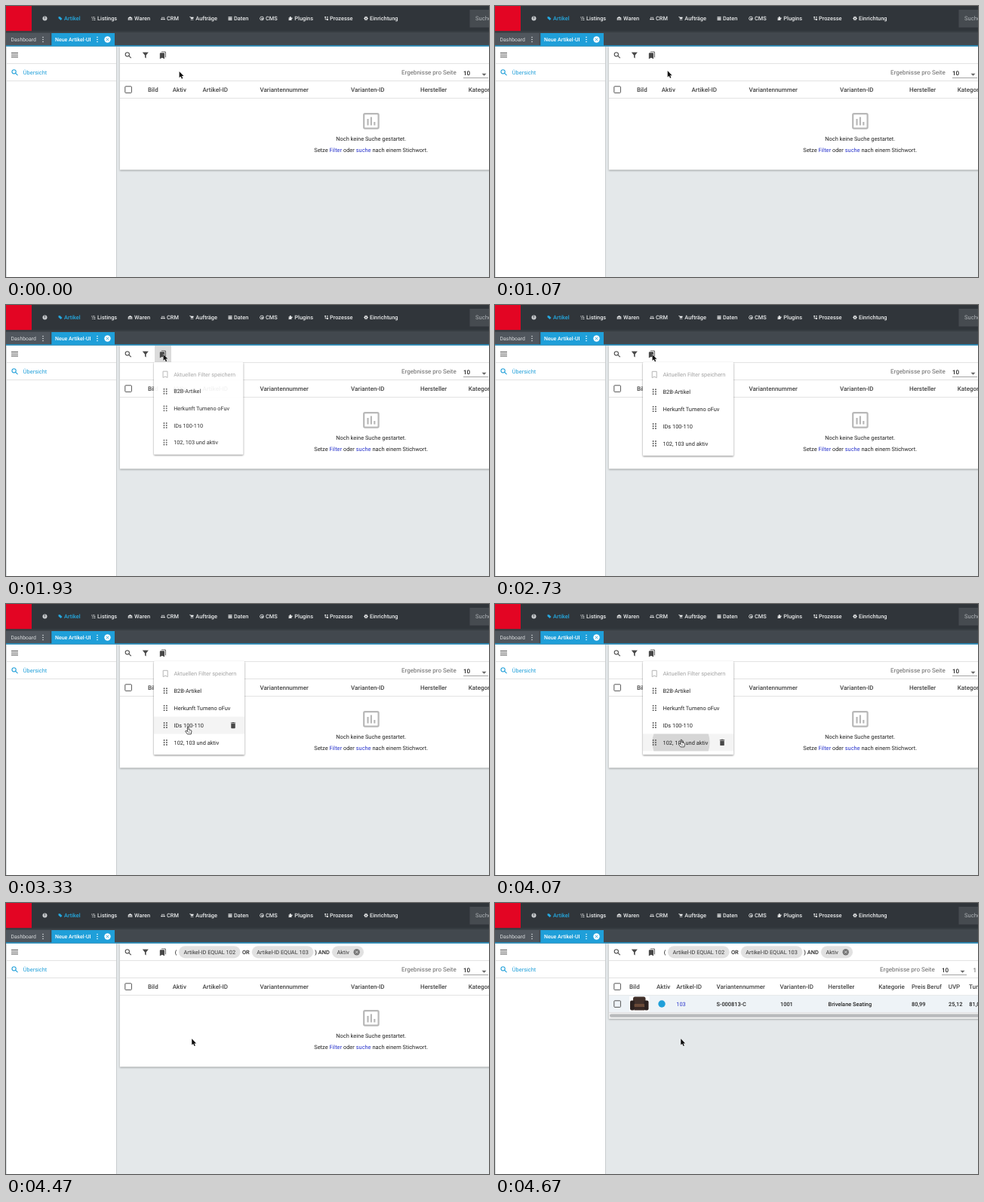
Recreate the animation shown at these times as an HTML page. Size 640 by 360 pixels, loop 6.33 s.

```html
<!DOCTYPE html>
<html lang="de">
<head>
<meta charset="utf-8">
<title>Artikelsuche mit gespeichertem Filter</title>
<style>
  html, body { margin: 0; width: 100%; height: 100%; overflow: hidden; background: #e4e8ea; }
  svg { display: block; }
  #stage { width: 100vw; height: 100vh; }
  text { font-family: Roboto, Arial, sans-serif; text-rendering: geometricPrecision; white-space: pre; }
  .card { filter: drop-shadow(0 1px 1px #0005); }
  .menu { filter: drop-shadow(0 1.2px 1.3px #0007); }
</style>
</head>
<body>
<svg id="stage" viewBox="0 0 640 360"></svg>
<script>
const LOOP = 6330, BLUE = '#1f9fd9', LINK = '#2a35cc', INK = '#222', ICON = '#484848';

const clamp = v => Math.max(0, Math.min(1, v));
const span = (k, a, b) => clamp((k - a) / (b - a));
const mix = (a, b, u) => a + (b - a) * u;
const smooth = u => u * u * (3 - 2 * u);
const cubic = u => u < .5 ? 4 * u ** 3 : 1 - 4 * (1 - u) ** 3;
const easeOut = u => 1 - (1 - u) ** 2.5;

const rect = (x, y, w, h, fill, more = '') =>
  `<rect x="${x}" y="${y}" width="${w}" height="${h}" fill="${fill}" ${more}/>`;
const dot = (x, y, r, fill, more = '') =>
  `<circle cx="${x}" cy="${y}" r="${r}" fill="${fill}" ${more}/>`;
const path = (d, fill, more = '') => `<path d="${d}" fill="${fill}" ${more}/>`;
const text = (x, y, s, fill = INK, size = 7.4, weight = 400, more = '') =>
  `<text x="${x}" y="${y}" fill="${fill}" font-size="${size}" font-weight="${weight}" ${more}>${s}</text>`;
const rule = (x, y, w, fill = '#dcdcdc') => rect(x, y, w, .8, fill);

// Icons live on a 24 unit grid
const shapes = {
  funnel: 'M2 2h20l-8 10v10l-4-3v-7z',
  bookmarks: 'M19 18l2 1V3a2 2 0 0 0-2-2H9a2 2 0 0 0-2 2h10a2 2 0 0 1 2 2zM15 5H5a2 2 0 0 0-2 2v16l7-3 7 3V7a2 2 0 0 0-2-2z',
  trash: 'M6 19a2 2 0 0 0 2 2h8a2 2 0 0 0 2-2V7H6zM19 4h-3.5l-1-1h-5l-1 1H5v2h14z',
  tag: 'M2 3h9l11 11-8 8L2 11z',
  list: 'M1 4h4v4H1zM8 4h10v3H8zM4 11h4v3H4zM11 11h11v3H11zM4 18h4v3H4zM11 18h11v3H11z',
  store: 'M1 22V9l11-7 11 7v13h-4V12H5v10zM8 14h8v3H8zM8 19h8v3H8z',
  people: 'M5 5h5v5H5zM14 5h5v5h-5zM1 19v-6h10v6zM13 19v-6h10v6z',
  cart: 'M1 2h5l1 3h16l-3 10H8L5 5H1zM8 18h4v4H8zM16 18h4v4h-4z',
  server: 'M2 3h20v5H2zM2 10h20v5H2zM2 17h20v5H2z',
  globe: 'M12 1a11 11 0 1 0 .1 0zM12 4a8 8 0 1 1-.1 0zM8 10h12v3H8zM10 15h9v3h-9z',
  puzzle: 'M2 8h6V2h6v6h8v6h-4v8H2v-6h4v-3H2z',
  flow: 'M3 2h7v6H8v8h6v-3h8v9h-8v-3H5V8H3zM14 3h7v5h-7z',
  gear: 'M10 1h4v4l4-2 3 4-3 3h5v4h-5l3 3-3 4-4-3v5h-4v-5l-4 3-3-4 3-3H1v-4h5L3 7l3-4 4 2zM12 9a3 3 0 1 0 .1 0z'
};
const at = (x, y, size, inner) =>
  `<g transform="translate(${x - size / 2} ${y - size / 2}) scale(${size / 24})">${inner}</g>`;
const icon = (name, x, y, size, fill = ICON) => at(x, y, size, path(shapes[name], fill, 'fill-rule="evenodd"'));
const search = (x, y, c) => at(x, y, 11.5,
  `<g fill="none" stroke="${c}" stroke-width="2.2"><circle cx="9.5" cy="9.5" r="5.5"/><path d="M13.5 13.5l6.3 6.3"/></g>`);
const kebab = (x, y, c) => [-3, 0, 3].map(d => dot(x, y + d, .8, c)).join('');
const close = (x, y, back, c) => dot(x, y, 4.2, back) +
  path(`M${x - 1.6} ${y - 1.6}l3.2 3.2m0-3.2l-3.2 3.2`, 'none', `stroke="${c}" stroke-width=".9"`);
const checkbox = y => rect(157.8, y - 4.2, 8.6, 8.6, 'none', 'stroke="#555" rx=".8"');

const nav = [
  ['tag', 72, 77, 'Artikel'], ['list', 116, 121, 'Listings'], ['store', 164.5, 170, 'Waren'],
  ['people', 208, 213, 'CRM'], ['cart', 246, 251.3, 'Aufträge'], ['server', 297, 302, 'Daten'],
  ['globe', 339, 344, 'CMS'], ['puzzle', 377, 382.3, 'Plugins'], ['flow', 424.5, 429, 'Prozesse'],
  ['gear', 477, 482, 'Einrichtung']
];

function header() {
  return rect(0, 0, 640, 34, '#30353a') + rect(0, 0, 34, 33.5, '#e30523') +
    dot(51.5, 16.5, 3, '#c9cccf') + text(50.1, 18.4, '?', '#30353a', 5, 700) +
    nav.map(([name, ix, tx, label], i) => {
      const c = i ? '#e9ebec' : '#25a9e0';
      return icon(name, ix, 16.5, 6, c) + text(tx, 19.2, label, c, 7.4, 500);
    }).join('') +
    rect(614.5, 5, 30, 23.5, '#464b50') + text(622, 19.4, 'Suche', '#aeb2b6', 7.6) +
    rect(0, 33.5, 640, 20, '#42484e') + rect(0, 33.5, 640, 1.5, '#373c41') +
    rect(0, 36, 58.5, 16.5, '#50565d') + text(6.6, 46.8, 'Dashboard', '#d9dcde', 6.9) + kebab(49, 44.5, '#d9dcde') +
    rect(60.3, 36, 83.7, 17, BLUE) + text(65, 46.8, 'Neue Artikel-UI', '#fff', 7, 500) +
    kebab(121, 44.5, '#fff') + close(134.5, 44.5, '#fff', BLUE) +
    rect(0, 52.3, 640, 1.3, BLUE);
}

function sidebar() {
  return rect(0, 53.6, 146.5, 307, '#fff') + rect(146, 53.6, .9, 307, '#c4c8ca') +
    rect(0, 53.6, .8, 307, '#cfd3d5') +
    [62.3, 65, 67.7].map(y => rect(7, y - .4, 9, 1, ICON)).join('') +
    rule(0, 76, 146) + search(11.8, 88.5, BLUE) + text(22.8, 91.1, 'Übersicht', BLUE) + rule(0, 99, 146);
}

function pager(x) {
  return text(x, 91.2, 'Ergebnisse pro Seite', '#666', 8) + text(x + 82, 91.5, '10', INK, 8, 500) +
    rule(x + 82, 95.2, 33, '#8c8c8c') + path(`M${x + 106.5} 89.7h6l-3 3z`, '#666');
}

const heads = cols => cols.map(([x, s]) => text(x, 114, s, '#444', 8, 500)).join('');

function emptyTable() {
  const link = s => `<tspan fill="${LINK}">${s}</tspan>`;
  return pager(524) + heads([[188, 'Bild'], [220.7, 'Aktiv'], [260.5, 'Artikel-ID'], [336.5, 'Variantennummer'],
    [457, 'Varianten-ID'], [549, 'Hersteller'], [612.7, 'Kategorie']]) +
    rect(474.2, 143.2, 19.4, 19.4, 'none', 'rx="1.5" stroke="#b8b8b8" stroke-width="2.2"') +
    [[478.4, 150], [482.8, 147.5], [487.2, 154]].map(([x, y]) => rect(x, y, 2.2, 158.5 - y, '#b8b8b8')).join('') +
    text(483.7, 178.8, 'Noch keine Suche gestartet.', INK, 7.45, 400, 'text-anchor="middle"') +
    text(483.7, 193.8, `Setze ${link('Filter')} oder ${link('suche')} nach einem Stichwort.`, INK, 7.45, 400, 'text-anchor="middle"');
}

function armchair() {
  return rect(178, 124, 26.5, 20, '#fff') + rect(183, 124.5, 16.5, 12, '#41302a', 'rx="2.5"') +
    rect(179, 129.5, 6, 13, '#2c211f', 'rx="2"') + rect(197.5, 129.5, 6, 13, '#2c211f', 'rx="2"') +
    rect(184.5, 134, 13.5, 4, '#6b4a38', 'rx="1"') + rect(184.5, 138, 13.5, 4.5, '#382824');
}

function resultTable() {
  const cells = [[293.5, 'S-000813-C'], [378, '1001'], [441.5, 'Brivelane Seating'], [552, '80,99'], [601, '25,12'], [628.3, '81,04']];
  return pager(510) + text(633.5, 91.5, '1', '#555', 8) +
    heads([[178, 'Bild'], [214, 'Aktiv'], [240.3, 'Artikel-ID'], [293.5, 'Variantennummer'], [377.5, 'Varianten-ID'],
      [441.3, 'Hersteller'], [508.3, 'Kategorie'], [552, 'Preis Beruf'], [600.7, 'UVP'], [628, 'Tumeno']]) +
    rect(151, 122.6, 489, 22.6, '#eef3f7') + checkbox(134) + armchair() + dot(221, 134, 4.7, BLUE) +
    text(240.3, 136.8, '103', LINK) + cells.map(([x, s]) => text(x, 136.8, s, INK, 7.4, 500)).join('') +
    rule(151, 145.2, 489) + rect(151, 146, 489, 7.5, '#f1f1f1') + rect(152, 147.4, 500, 4.4, '#b8babc', 'rx="2"');
}

function chips() {
  const chip = (x, w, s) => rect(x, 57.2, w, 16, '#e1e1e1', 'rx="8"') + text(x + 6.5, 67.7, s, '#333', 7.35);
  return text(223.7, 67.7, '(', INK, 7.4, 500) + chip(229, 81.5, 'Artikel-ID EQUAL 102') +
    text(313, 67.7, 'OR', INK, 7.4, 500) + chip(325.8, 81.5, 'Artikel-ID EQUAL 103') +
    text(409.3, 67.7, ') AND', INK, 7.4, 500) + chip(432, 42, 'Aktiv') + close(464.7, 65.2, '#777', '#e1e1e1');
}

function card(k) {
  const done = k >= 70;
  return rect(150.8, 53.6, 500, done ? 100 : 164, '#fff', 'class="card"') +
    rule(151, 76, 489) + rule(151, 99, 489) + rule(151, 122, 489) + checkbox(111) +
    rect(197, 54, 22, 22, '#000', `opacity="${k >= 27 ? .14 * clamp((32 - k) / 3) : 0}"`) +
    search(162, 65.5, ICON) + icon('funnel', 184.8, 65.5, 9.6) + icon('bookmarks', 207.8, 65.3, 10.6) +
    (k >= 64 ? chips() : '') + (done ? resultTable() : emptyTable());
}

function tooltip(k) {
  if (k < 23 || k >= 27) return '';
  const e = easeOut(span(k, 22, 25));
  return `<g opacity="${e}" transform="translate(207.5 41) scale(${e})">` +
    rect(-33.2, -7.8, 66.4, 15.5, '#616161', 'rx="1.4" opacity=".92"') +
    text(0, 2.4, 'Gespeicherte Filter', '#fff', 6.67, 400, 'text-anchor="middle"') + '</g>';
}

const TOP = 4.9, ROW = 22.9;
const filters = ['Aktuellen Filter speichern', 'B2B-Artikel', 'Herkunft Tumeno oFuv', 'IDs 100-110', '102, 103 und aktiv'];

function menu(k, hover) {
  if (k < 28 || k >= 64) return '';
  const e = easeOut(span(k, 27, 30));
  // The longest entry needs extra room for its bin
  const w = hover == 2 ? 129 : 120;
  const rows = filters.map((s, i) => {
    const y = TOP + i * ROW, mid = y + ROW / 2;
    const grip = [-3, 0, 3].map(d => dot(13.6, mid + d, .95, '#555') + dot(16.9, mid + d, .95, '#555')).join('');
    const ripple = i == 4 && k >= 61
      ? `<svg y="${y}" width="${w}" height="${ROW}">${dot(50.5, ROW / 2, 38 + (k - 61) * 14, '#000', 'opacity=".12"')}</svg>` : '';
    return (i == hover ? rect(0, y, w, ROW, '#f4f4f4') : '') + ripple +
      (i ? grip : path('M12.2 12.3h6v8.4l-3-1.5-3 1.5z', 'none', 'stroke="#b5b5b5"')) +
      (i && i == hover ? icon('trash', w - 15, mid, 11) : '') +
      text(26.5, mid + 2.6, s, i ? INK : '#a3a3a3');
  }).join('');
  return `<g opacity="${e * clamp((64 - k) / 2)}" transform="translate(196 76) scale(${.8 + .2 * e})">` +
    rect(0, 0, w, 124.3, '#fff', 'class="menu" rx="1"') + rows + '</g>';
}

function pointer(x, y, hand) {
  const shape = hand
    ? path('M-.2 .3q1-.9 1.7 0v3.4l2.9.7q1 .3.9 1.4l-.7 3.8h-4.8l-2.7-3.6q0-1.2 1.2-.8l1.5 1z', '#fff', 'stroke="#222" stroke-width=".8"') +
      path('M1.2 6v2m1.5-2v2', 'none', 'stroke="#222" stroke-width=".5"')
    : path('M0 0v8.3l1.9-1.7 1.4 3.1 1.4-.6-1.4-3h2.6z', '#111', 'stroke="#fff" stroke-width=".8" paint-order="stroke"');
  return `<g transform="translate(${x} ${y})">${shape}</g>`;
}

function scene(k) {
  const a = smooth(span(k, 15, 23)), b = cubic(span(k, 40, 55));
  const x = mix(mix(229.6, 208.5, a), 246.2, b), y = mix(mix(87, 65.5, a), 180.3, b);
  const row = Math.floor((y - 76 - TOP) / ROW);
  const hover = k >= 41 && k < 64 && row > 0 ? row : -1;
  return rect(0, 0, 640, 360, '#e4e8ea') + card(k) + sidebar() + header() +
    tooltip(k) + menu(k, hover) + pointer(x, y, hover > 0);
}

const stage = document.getElementById('stage');
let shown = -1;
function play(now) {
  const k = Math.floor(now % LOOP * .015 + .06);
  if (k != shown) stage.innerHTML = scene(shown = k);
  requestAnimationFrame(play);
}
play(performance.now());
</script>
</body>
</html>
```
